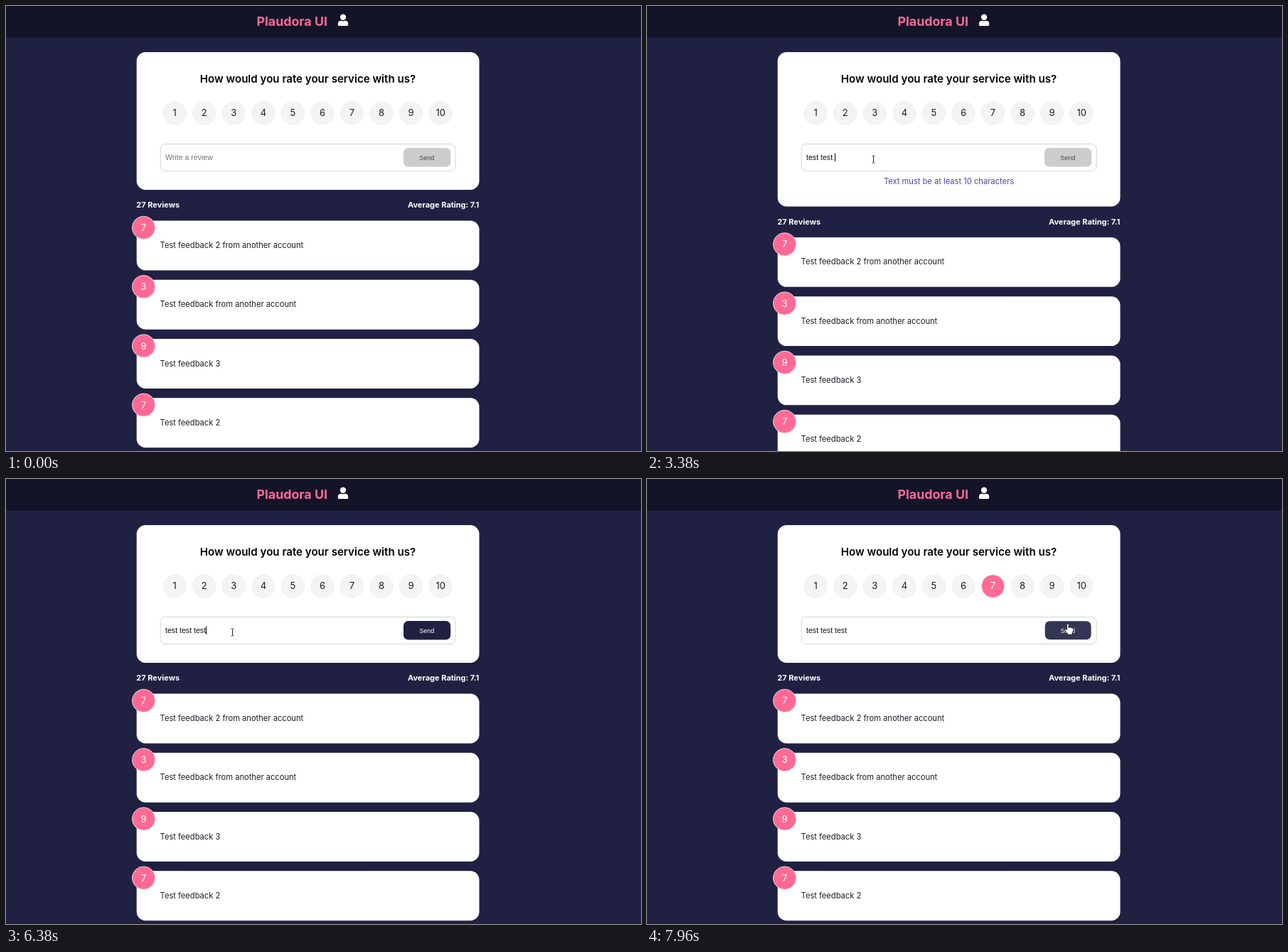
Recreate the animation shown at these times as an HTML page. Size 893x627 px, loop 8000 ms.

```html
<!DOCTYPE html>
<html lang="en">
<head>
<meta charset="utf-8">
<title>Review form</title>
<style>
  html, body { margin: 0; width: 100%; height: 100%; overflow: hidden; background: #202142; }
  svg { display: block; width: 893px; height: 627px; }
  text { font: 11.15px Inter, sans-serif; fill: #1c1c2a; white-space: pre; }
  .title { font-size: 17.8px; font-weight: 700; fill: #ff6a95; }
  .heading { font-size: 15.1px; font-weight: 600; fill: #000; }
  .stat { font-size: 11px; font-weight: 700; fill: #fff; }
  .digit { font-size: 13px; }
  .badge { fill: #fff; }
  .warning { fill: #50459a; }
  .field { font: 10.6px "Liberation Sans", Arial, sans-serif; }
  .send { font: 9px "Liberation Sans", Arial, sans-serif; }
  .mid { text-anchor: middle; }
  .end { text-anchor: end; }
</style>
</head>
<body>
<svg id="stage" viewBox="0 0 893 627"></svg>
<script>
const LOOP = 8000, PILL_Y = 151, PILL_R = 16.2, WARNING_HEIGHT = 23.4;
const pillX = i => 237.2 + 41.55 * i;

const text = (x, y, cls, str, id = "") => `<text x="${x}" y="${y}" class="${cls}" id="${id}">${str}</text>`;
const box = (x, y, w, h, r, attrs) => `<rect x="${x}" y="${y}" width="${w}" height="${h}" rx="${r}" ${attrs}/>`;
const disc = (x, y, fill, id = "") =>
  `<circle cx="${x}" cy="${y}" r="${PILL_R}" fill="${fill}" stroke="#eee" stroke-width=".83" id="${id}"/>`;

const reviews = [
  [7, "Test feedback 2 from another account"],
  [3, "Test feedback from another account"],
  [9, "Test feedback 3"],
  [7, "Test feedback 2"]
];

const pills = Array.from({ length: 10 }, (_, i) =>
  disc(pillX(i), PILL_Y, "#f4f4f4", "pill" + i) +
  text(pillX(i), PILL_Y + 4.4, "digit mid", i + 1, "digit" + i)).join("");

const reviewCards = reviews.map(([rating, comment], i) =>
  `<g transform="translate(0 ${83.25 * i})">` +
  box(183.7, 302.6, 481.8, 69.8, 12.4, 'fill="#fff"') +
  disc(193.6, 312.4, "#ff6a95") +
  text(193.6, 317, "digit badge mid", rating) +
  text(216.6, 341, "", comment) + "</g>").join("");

const stage = document.getElementById("stage");
stage.innerHTML =
  box(0, 0, 893, 44.5, 0, 'fill="#131428"') +
  text(352.5, 27.6, "title", "Plaudora UI") +
  `<g fill="#fff"><circle cx="474" cy="15.7" r="4.2"/>
   <path d="M466.8 26.4V25a4.4 4.4 0 0 1 4.4-4.3h.5a5.5 5.5 0 0 0 4.6 0h.5a4.4 4.4 0 0 1 4.4 4.3v1.4a1.6 1.6 0 0 1-1.6 1.6h-11.2a1.6 1.6 0 0 1-1.6-1.6z"/></g>` +
  box(183.7, 65, 481.8, 194, 12.4, 'fill="#fff" id="card"') +
  text(424.5, 108, "heading mid", "How would you rate your service with us?") +
  pills +
  box(217.2, 194.5, 414.8, 37.8, 6.2, 'fill="#fff" stroke="#ccc" stroke-width=".83"') +
  text(224, 216.5, "field", "", "field") +
  box(224, 207.5, 1, 11.5, 0, 'id="caret"') +
  `<g id="send">${box(559, 200, 66.2, 26.5, 6.6, 'id="sendBox"')}${text(591.7, 216.6, "send mid", "Send", "sendLabel")}</g>` +
  text(424.5, 251, "warning mid", "Text must be at least 10 characters", "warning") +
  `<g id="below">${text(183.3, 284.3, "stat", "27 Reviews")}${text(665.3, 284.3, "stat end", "Average Rating: 7.1")}${reviewCards}</g>` +
  `<path id="cursor" stroke-linejoin="round"/>`;

const el = {};
stage.querySelectorAll("[id]").forEach(node => el[node.id] = node);

const set = (node, attrs) => { for (const k in attrs) node.setAttribute(k, attrs[k]); };
const show = (node, on) => node.style.display = on ? "" : "none";

// Moments at which each further character of the phrase appears
const phrase = "test test teset";
const keyTimes = [1520, 1650, 1780, 1910, 2110, 2310, 2390, 2590, 3050, 3380, 3910, 4370, 4570, 4770, 5100];
function typedText(t) {
  if (t >= 6380) return "test test test";
  if (t >= 5910) return phrase.slice(0, -2);
  if (t >= 5810) return phrase.slice(0, -1);
  return phrase.slice(0, keyTimes.filter(k => k <= t).length);
}

const caretSpans = [[740, 1260], [1520, 5710], [6180, 6910]];

// Pointer path: time, x, y
const path = [
  [70, 806, 579], [290, 650, 445], [480, 430, 270], [630, 335, 210], [800, 318.5, 216],
  [6770, 318.5, 216], [6980, 366, 194], [7190, 459.5, 153.3], [7260, 479, 148], [7400, 487, 151],
  [7610, 488, 152], [7680, 499, 160], [7750, 530, 178], [7820, 561, 194], [7890, 581, 202], [7960, 592, 204]
];
function pointerAt(t) {
  const start = t < 6840 ? 70 : 6840;
  const time = start + Math.floor((t - start) / 70) * 70;
  const next = path.findIndex(p => p[0] > time);
  if (next < 0) return path[path.length - 1].slice(1);
  const [t0, x0, y0] = path[next - 1], [t1, x1, y1] = path[next];
  const k = (time - t0) / (t1 - t0);
  return [x0 + (x1 - x0) * k, y0 + (y1 - y0) * k];
}

const shapes = {
  arrow: "M0 0V13.2L3 10.4 5 15 7 14.1 5 9.6H9.3Z",
  beam: "M-2-5H-.8L0-4.4.8-5H2M0-4.4V4.4M-2 5H-.8L0 4.4.8 5H2",
  hand: "M-1.5 9V1.2a1.3 1.3 0 0 1 2.6 0V6l.4-.9a1.2 1.2 0 0 1 2 .5l.4-.2a1.2 1.2 0 0 1 1.9.7h.3a1.2 1.2 0 0 1 1.4 1.2V10L6 13v2.3H-.5V14L-4.4 9a1.2 1.2 0 0 1 1.8-1.4z"
};
const inside = (x, y, l, t, r, b) => x >= l && x <= r && y >= t && y <= b;

const mix = (a, b, k) => `rgb(${a.map((v, i) => Math.round(v + (b[i] - v) * k))})`;
function pillLevel(i, t) {
  if (i === 5) return t >= 7190 && t < 7260 ? 0.04 : 0;
  const k = Math.min(1, Math.max(0, (t - 7260) / 300));
  return i === 6 ? k * k * (3 - 2 * k) : 0;
}

function render(t) {
  const value = typedText(t);
  const ready = value.trim().length >= 10;
  const warn = value !== "" && !ready;

  el.field.textContent = value || "Write a review";
  el.field.style.fill = value ? "#111" : "#757575";
  set(el.caret, { x: 224 + (value ? el.field.getComputedTextLength() : 0) });
  show(el.caret, caretSpans.some(([from, to]) => t >= from && t < to));

  show(el.warning, warn);
  set(el.card, { height: 194 + (warn ? WARNING_HEIGHT : 0) });
  set(el.below, { transform: `translate(0 ${warn ? WARNING_HEIGHT : 0})` });

  for (const i of [5, 6]) {
    const level = pillLevel(i, t);
    set(el["pill" + i], { fill: mix([244, 244, 244], [255, 106, 149], level) });
    el["digit" + i].style.fill = mix([28, 28, 42], [255, 255, 255], level);
  }

  show(el.cursor, t >= 70);
  const [x, y] = pointerAt(Math.max(t, 70));
  const onSend = inside(x, y, 559, 200, 625, 226.5);
  const onPill = [...Array(10).keys()].some(i => Math.hypot(x - pillX(i), y - PILL_Y) < 16.7);
  const kind = onSend || onPill ? "hand" : inside(x, y, 217, 194, 632, 232) ? "beam" : "arrow";
  set(el.cursor, {
    d: shapes[kind],
    transform: `translate(${x} ${y})`,
    fill: kind === "beam" ? "none" : "#fff",
    stroke: "#222",
    "stroke-width": kind === "beam" ? 1 : 0.9
  });

  set(el.sendBox, { fill: ready ? "#202142" : "#ccc" });
  el.sendLabel.style.fill = ready ? "#fff" : "#444";
  const hover = ready && onSend;
  set(el.send, {
    opacity: hover ? 0.9 : 1,
    transform: hover ? "translate(592.1 213.2) scale(.98) translate(-592.1 -213.2)" : ""
  });
}

const begin = performance.now();
function tick() {
  render((performance.now() - begin) % LOOP);
  requestAnimationFrame(tick);
}
tick();
</script>
</body>
</html>
```
